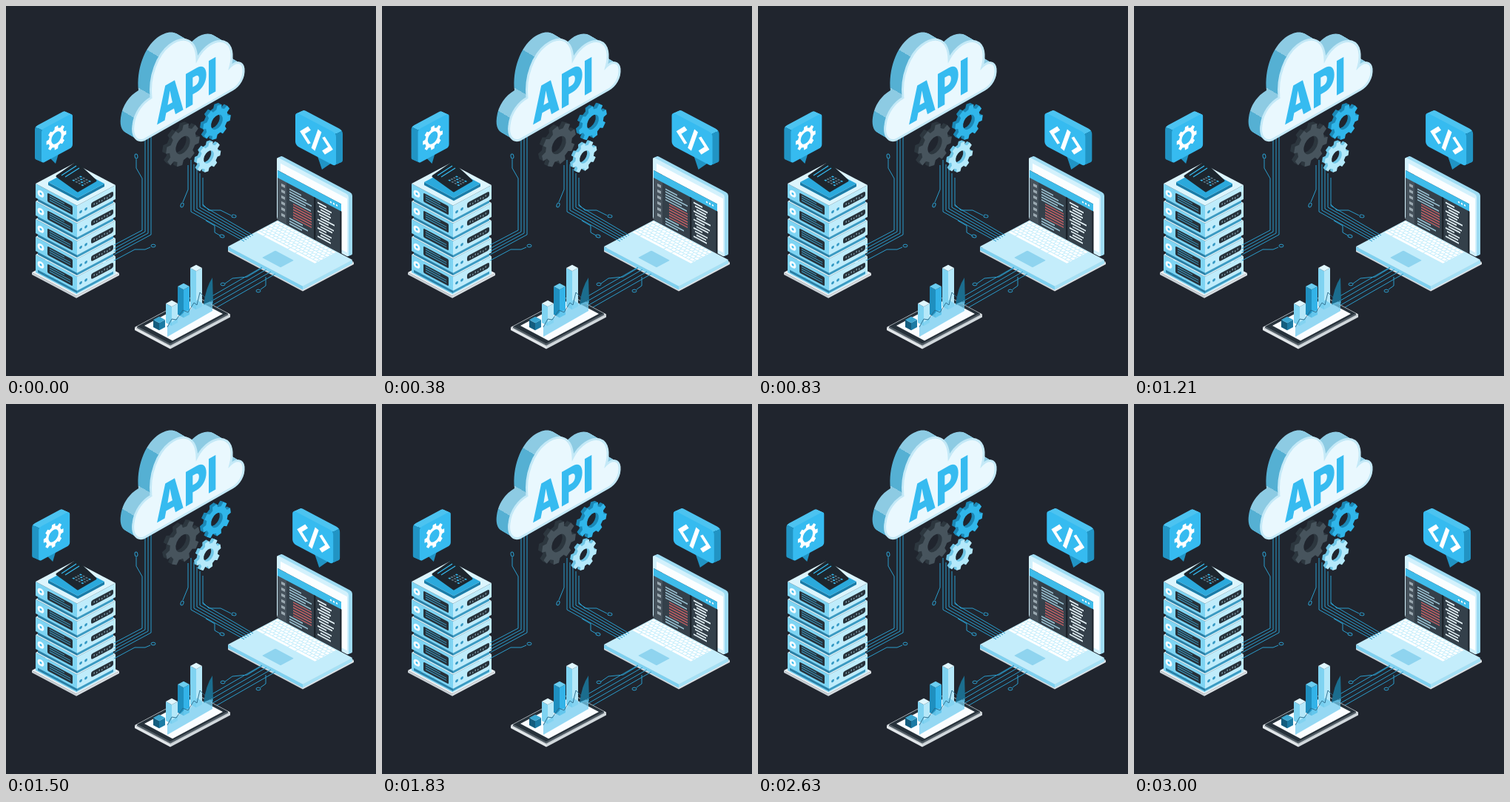
Recreate the animation shown at these times as an HTML page. Size 500x500 px, loop 3040 ms.

```html
<!DOCTYPE html>
<html lang="en">
<head>
<meta charset="utf-8">
<title>API</title>
<style>
  html, body { margin: 0; width: 100%; height: 100%; overflow: hidden; background: #20252e; }
  svg { display: block; width: 100vw; height: 100vh; }
</style>
</head>
<body>
<svg id="stage" viewBox="0 0 500 500"></svg>
<script>
const LOOP = 3040;
const SLOPE = .53;
const DARK = '#27323b', WIRE = '#2b9ccb', SKY = '#36bbf0', DEEP = '#2194c4';
const PALE_BOX = ['#7fd3f1', '#b5e8f9', '#e0f7fe'];
const BLUE_BOX = ['#1f8fbf', '#33b3e8', '#6bcdf0'];

const shape = (d, fill, extra = '') => `<path d="${d}" fill="${fill}" ${extra}/>`;
const line = (d, color, width = 1, extra = '') => shape(d, 'none', `stroke="${color}" stroke-width="${width}" ${extra}`);
const rect = (x, y, w, h, fill, r = 0) =>
  `<rect x="${x}" y="${y}" width="${w}" height="${h}" rx="${r}" fill="${fill}"/>`;
const dot = (x, y, r, fill) => `<circle cx="${x}" cy="${y}" r="${r}" fill="${fill}"/>`;
const group = (transform, body) => `<g transform="${transform}">${body}</g>`;
const repeat = (n, make) => Array.from({ length: n }, (_, i) => make(i)).join('');

// Isometric planes: walls facing left and right, and the floor.
const leftWall = (x, y, body) => group(`matrix(1 ${SLOPE} 0 1 ${x} ${y})`, body);
const rightWall = (x, y, body) => group(`matrix(1 ${-SLOPE} 0 1 ${x} ${y})`, body);
const floor = (x, y, body) => group(`matrix(1 ${SLOPE} 1 ${-SLOPE} ${x} ${y})`, body);

// Box with its left top corner at x, y; a runs down right, b runs up right.
const box = (x, y, a, b, h, [left, right, top]) =>
  leftWall(x, y, rect(0, 0, a, h, left))
  + rightWall(x + a, y + a * SLOPE, rect(0, 0, b, h, right))
  + floor(x, y, rect(0, 0, a, b, top));

// Repeats a body from its back position to just behind the front.
const sweep = (dx, dy, body) => {
  const n = Math.ceil(Math.hypot(dx, dy));
  return repeat(n, i => group(`translate(${dx * (1 - i / n)} ${dy * (1 - i / n)})`, body));
};

// Hard-edged bands, alternating between two colours.
const bands = (id, [x1, y1, x2, y2], stops, light, dark) =>
  `<linearGradient id="${id}" gradientUnits="userSpaceOnUse" x1="${x1}" y1="${y1}" x2="${x2}" y2="${y2}">`
  + stops.map((at, i) => [0, 1].map(k =>
    `<stop offset="${at}" stop-color="${(i + k) % 2 ? dark : light}"/>`).join('')).join('')
  + '</linearGradient>';

function gearPath(R, hole) {
  const points = [];
  for (let i = 0; i < 8; i++) {
    for (const [offset, r] of [[-.24, .78], [-.16, 1], [.16, 1], [.24, .78]]) {
      const a = i * Math.PI / 4 + offset;
      points.push(`${(R * r * Math.cos(a)).toFixed(2)} ${(R * r * Math.sin(a)).toFixed(2)}`);
    }
  }
  const h = R * hole;
  return `M${points.join('L')}ZM${h} 0A${h} ${h} 0 1 0 ${-h} 0A${h} ${h} 0 1 0 ${h} 0Z`;
}

const gearWall = (x, y, body) => group(`matrix(.82 -.45 0 .95 ${x} ${y})`, body);

function gear(x, y, R, face, side, turn) {
  const wheel = fill => gearWall(x, y,
    shape(gearPath(R, .42), fill, `fill-rule="evenodd" class="gear" data-turn="${turn}"`));
  return sweep(-R * .18, -R * .09, wheel(side)) + wheel(face);
}

function branch(d, x, y, angle) {
  return line(d, WIRE) + `<ellipse rx="3" ry="1.9" transform="translate(${x} ${y}) rotate(${angle})" fill="none" stroke="${WIRE}"/>`;
}

function wires() {
  const toServer = i => `M${188 + 4 * i} 175V${305 + 2 * i}L146 ${305 + 2 * i + (42 + 4 * i) * .54}`;
  const toLaptop = i => `M${250 + 4 * i} ${208 + 6 * i}V${278 - 2 * i}L${322 + 3 * i} ${318 - 2 * i}`;
  const toTablet = i => `M${346 + 6 * i} ${353 + 3 * i}L${268 + 4 * i} ${398 + 4 * i}`;
  return line(repeat(3, toServer) + repeat(5, toLaptop) + repeat(4, toTablet), WIRE)
    + branch('M176 207V219L184 233V303L146 323', 176, 203, 80)
    + branch('M146 344L174 329H188L195 326', 199, 324, 0)
    + branch('M266 268L274 276H290L304 283', 308, 284, 10)
    + branch('M246 215V248L239 265', 238, 269, 110)
    + branch('M270 290L282 297V306L289 310', 292, 311, 15)
    + branch('M296 375L306 368L326 366L346 354', 293, 376, 0)
    + branch('M344 383L351 378V366', 341, 385, 0);
}

function cloud() {
  const front = 'M186 181C176 184 170 175 172 161C174 144 184 131 196 124' +
    'C193 96 204 66 221 53C240 39 257 44 258 72C267 55 282 45 294 48C306 52 307 67 303 82' +
    'C311 74 320 75 321 85C322 97 315 108 306 113Z';
  return bands('cloudSide', [189, 59, 146, 136], [0, .57, 1], '#8dcbe3', '#55b0d3')
    + sweep(-17, -10, shape(front, 'url(#cloudSide)'))
    + shape(front, '#e9f8fe', 'stroke="#c4e9f7" stroke-width="3"')
    + `<text transform="matrix(.74 -.42 0 1 203 161)" font-family="Inter, sans-serif" font-weight="900" font-size="64" fill="${SKY}">API</text>`;
}

function serverUnit(i) {
  const y = 240 + 24 * i;
  const left = dot(7, 10, 4.4, '#f2fbff') + dot(7, 10, 1.5, SKY)
    + rect(16, 4, 34, 12, DARK, 1.5)
    + repeat(3, k => rect(19, 6 + 3 * k, k ? 28 : 20, 1.2, '#3b9ac2'));
  const right = dot(5, 11, 1.9, '#3298c4') + dot(12, 11, 1.9, '#3298c4')
    + rect(19, 6.5, 30, 7.5, DARK, 2.5)
    + repeat(7, k => rect(22.5 + 3.5 * k, 9 + k % 2, 1.4, 2.4, '#7894a1'));
  return box(43, y + 16, 53, 49, 8, ['#2b7fa5', '#3b9ac2', DARK])
    + box(40, y, 56, 52, 19, ['#7ed4f3', '#bfecfb', '#dcf5fd'])
    + leftWall(40, y, left) + rightWall(96, y + 56 * SLOPE, right);
}

function server() {
  const keys = repeat(4, r => repeat(4, c => rect(4 + 5 * r, 5 + 4 * c, 3, 2.4, (r + c) % 3 ? '#5d7583' : SKY)));
  return box(35, 360, 60, 58, 3, ['#c9d0d5', '#d9dfe3', '#edf1f3'])
    + box(40, 350, 56, 52, 10, ['#7ed4f3', '#bfecfb', '#bfecfb'])
    + repeat(5, k => serverUnit(4 - k))
    + leftWall(52, 361, repeat(4, k => dot(6 * k, 1, 1, DEEP)))
    + box(57, 238, 40, 36, 4, ['#1a7ca8', '#1a7ca8', '#2ba9dc'])
    + shape('M69 230L95 212L121 236L97 250Z', '#1d262e', 'stroke="#1d262e" stroke-width="3" stroke-linejoin="round"')
    + line('M75 229L95 216M80 231L99 219', SKY, 1.3)
    + floor(82, 236, group('scale(.8)', keys));
}

function keyboard() {
  const row = r => line(`M2 ${2 + r * 4.2}H81`, '#fff', 3.2,
    `stroke-dasharray="${r === 0 ? '9 1 32 1' : '4 1'}" stroke-dashoffset="${r % 2 * 2}"`);
  return floor(336, 305, repeat(7, row));
}

function codeWindow() {
  const code = i => {
    const red = i > 4 && i < 11;
    return rect(red ? 21 : 16, 16 + 3.6 * i, red ? 25 : 16 + i * 7 % 15, 1.7, red ? '#c25f64' : '#9cc3d4');
  };
  const note = i => rect(54 + i % 3 * 2, 14 + 3.8 * i, 12 + i * 5 % 9, 1.9, '#e4f1f6');
  return rect(0, 0, 86, 67, '#34404a') + rect(0, 0, 12, 67, '#46525c') + rect(0, 0, 86, 10, '#3fbcea')
    + rect(49, 10, 2.5, 57, '#1b232b') + rect(84.5, 10, 2, 57, '#1b232b')
    + repeat(3, i => dot(72 + 4 * i, 5, 1.2, '#fff'))
    + repeat(6, i => rect(5, 15 + 8 * i, 5, 3.8, '#9aa8b0'))
    + repeat(14, code) + repeat(13, note);
}

function laptop() {
  const frame = fill => leftWall(366, 204, rect(0, 0, 97, 84, fill, 3));
  return box(300, 329, 101, 69, 3, ['#d0d8dd', '#dde3e7', '#d0d8dd'])
    + box(300, 325, 101, 67, 5, ['#7fd1f0', '#a4e0f5', '#c4edfb'])
    + keyboard()
    + floor(346, 340, rect(0, 0, 25, 18, '#8fd4ef', 1))
    + sweep(5, -2, frame('#9edcf3')) + frame('#d3f1fc')
    + leftWall(366, 204, rect(5, 6, 90, 73, '#fbfeff'))
    + leftWall(367, 222, codeWindow());
}

function tablet() {
  return box(174, 434, 48, 81, 4, ['#e2e7ea', '#d2d9dd', '#e2e7ea'])
    + box(177, 433, 45, 78, 2, ['#47535c', '#47535c', DARK])
    + floor(187, 432, rect(0, 0, 38, 68, '#fafdff'))
    + shape('M267 404Q270 380 279 367L280 402Z', '#1b6d8e')
    + box(249, 354, 8, 8, 52, PALE_BOX) + box(232, 379, 8, 8, 38, BLUE_BOX)
    + box(216, 402, 8, 8, 26, PALE_BOX) + box(199, 424, 8, 8, 10, ['#145d7e', '#1c7ba4', '#3ca6d0'])
    + shape('M218 447V432L235 419L242 412L249 411L258 397L267 403L279 398V412Z', '#73cdef', 'opacity=".75"')
    + line('M218 434L224 423L230 424L239 411L246 414L254 401L258 404L262 387L268 393L278 400', '#28698a', .9);
}

function leftBubble() {
  const panel = fill => rightWall(48, 167, rect(0, 0, 42, 46, fill, 4));
  return bands('leftSide', [0, 0, -1, 1], [0], '#4cc3f0', DEEP)
    + sweep(-9, -4, panel('url(#leftSide)'))
    + shape('M57 203L67 213L72 196Z', DEEP) + panel(SKY)
    + gearWall(68, 178, shape(gearPath(16.5, .5), '#fff', 'fill-rule="evenodd"'));
}

function rightBubble() {
  const panel = fill => leftWall(391, 143, rect(0, 0, 55, 45, fill, 5));
  return bands('rightSide', [55, 0, 56, 1], [0], '#4cc3f0', DEEP)
    + sweep(9, -4, panel('url(#rightSide)'))
    + shape('M421 203L427 221L440 212Z', DEEP) + panel(SKY)
    + leftWall(391, 143, line('M19 12L9.5 23L19 33M33 8L24 38M38 14L47.5 24L38 35', '#fff', 5));
}

document.getElementById('stage').innerHTML =
  server() + laptop() + wires() + tablet() + cloud()
  + gear(239, 188, 28, '#47545d', '#2d373f', 1)
  + gear(285, 157, 23, '#30b6ea', '#1b88b6', -1)
  + gear(274, 204, 20, '#b4e9fb', '#6fc6e6', -1)
  + `<g class="bubble">${leftBubble()}</g><g class="bubble">${rightBubble()}</g>`;

const gears = document.querySelectorAll('.gear');
const bubbles = document.querySelectorAll('.bubble');

const ease = (t, from, to) => {
  const p = Math.min(1, Math.max(0, (t - from) / (to - from)));
  return p * p * (3 - 2 * p);
};

// Bubbles sway sideways under a swelling envelope; gears advance one tooth twice.
function render(t) {
  const p = t / LOOP;
  const swing = 4.7 * Math.max(0, Math.sin(Math.PI * p ** .85)) ** 1.6;
  const shift = swing * Math.cos(2 * Math.PI * (4.85 * p - .8));
  bubbles.forEach(b => b.setAttribute('transform', `translate(${shift.toFixed(2)} 0)`));

  const angle = 45 * (ease(t, 0, 800) + ease(t, 1130, 1930));
  gears.forEach(g => g.setAttribute('transform', `rotate(${11 + angle * g.dataset.turn})`));
}

const start = performance.now();
function tick() {
  render((performance.now() - start) % LOOP);
  requestAnimationFrame(tick);
}
render(0);
requestAnimationFrame(tick);
</script>
</body>
</html>
```
